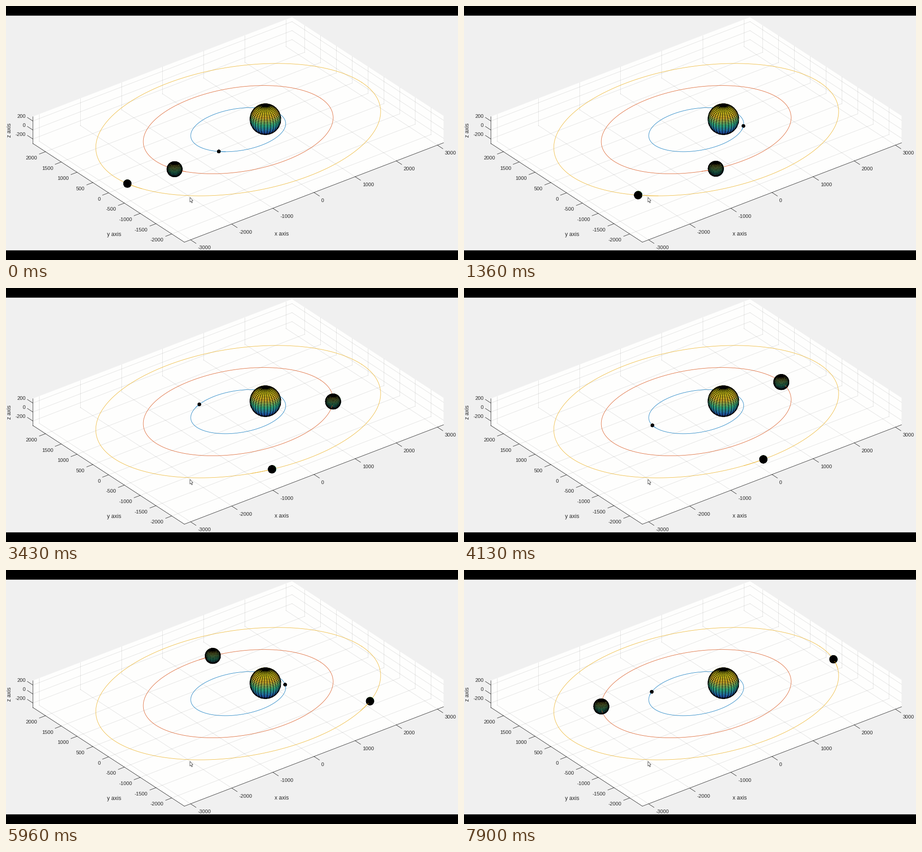
Animation of 998x561 px, one loop 8000 ms. Source, as a matplotlib script:

```python
import numpy as np
import matplotlib.pyplot as plt
from matplotlib.animation import FuncAnimation
from matplotlib.colors import LinearSegmentedColormap
from matplotlib.patches import Polygon, Rectangle

W, H, DPI = 998, 561, 100
PX = 72 / DPI                       # one pixel in points
INK = (0.15, 0.15, 0.15)
AZ, EL = np.radians(37.5), np.radians(30)
SCALE = 0.1145                      # pixels per data unit
CENTER = np.array([512.7, 273.1])
XM, YM, ZM = 3150, 2400, 300        # axis limits
N = 30                              # facets of each sphere
STEP_ANGLE = 2 * np.pi / 50
INTERVAL, FRAMES = 20, 400

PARULA = LinearSegmentedColormap.from_list(
    "parula", ["#3e26a8", "#2e87f7", "#37c897", "#e6bb2d", "#f9fb15"])


def project(x, y, z=0):
    """Orthographic view: screen x, screen y and depth toward the viewer."""
    across = x * np.cos(AZ) - y * np.sin(AZ)
    away = x * np.sin(AZ) + y * np.cos(AZ)
    sx = CENTER[0] + SCALE * across
    sy = CENTER[1] - SCALE * (away * np.sin(EL) + z * np.cos(EL))
    return sx, sy, z * np.sin(EL) - away * np.cos(EL)


fig = plt.figure(figsize=(W / DPI, H / DPI), dpi=DPI, facecolor="#f0f0f0")
ax = fig.add_axes([0, 0, 1, 1])
ax.set_xlim(0, W)
ax.set_ylim(H, 0)
ax.axis("off")


def segment(p, q, **style):
    a, b = project(*p), project(*q)
    ax.plot([a[0], b[0]], [a[1], b[1]], **style)


def label(x, y, text, ha="center", size=11.2, rotation=0):
    ax.text(x, y, text, ha=ha, va="center", color=INK, rotation=rotation,
            family="Liberation Sans", fontsize=size * PX)


def tick(point, direction, text, ha, offset):
    """Tick mark along a data direction, with its number beside it."""
    x, y, _ = project(*point)
    dx, dy = np.array(project(*direction)[:2]) - CENTER
    k = 14.5 / np.hypot(dx, dy)
    ax.plot([x, x + k * dx], [y, y + k * dy], color=INK, lw=0.85 * PX, zorder=1)
    label(x + offset[0], y + offset[1], text, ha)


def draw_box():
    corners = [(-XM, YM, -ZM), (-XM, YM, ZM), (XM, YM, ZM),
               (XM, -YM, ZM), (XM, -YM, -ZM), (-XM, -YM, -ZM)]
    ax.add_patch(Polygon([project(*c)[:2] for c in corners],
                         fc="#fefefd", ec="none", zorder=0))
    grid = dict(color=INK, alpha=0.14, lw=0.85 * PX, zorder=1)
    axis = dict(color=INK, lw=0.85 * PX, zorder=1)
    for x in range(-3000, 3001, 1000):
        segment((x, -YM, -ZM), (x, YM, -ZM), **grid)
        segment((x, YM, -ZM), (x, YM, ZM), **grid)
        tick((x, -YM, -ZM), (0, -1000, 0), str(x), "left", (16, 18))
    for y in range(-2000, 2001, 500):
        segment((-XM, y, -ZM), (XM, y, -ZM), **grid)
        segment((XM, y, -ZM), (XM, y, ZM), **grid)
        tick((-XM, y, -ZM), (-1000, 0, 0), str(y), "right", (-18, 14))
    for z in range(-200, 201, 200):
        segment((-XM, YM, z), (XM, YM, z), **grid)
        segment((XM, YM, z), (XM, -YM, z), **grid)
        tick((-XM, YM, z), (0, 1000, 0), str(z), "right", (-16, -10))
    segment((-XM, -YM, -ZM), (XM, -YM, -ZM), **axis)
    segment((-XM, -YM, -ZM), (-XM, YM, -ZM), **axis)
    segment((-XM, YM, -ZM), (-XM, YM, ZM), **axis)
    label(609, 504, "x axis", size=12.2)
    label(239, 505, "y axis", size=12.2)
    label(8, 274, "z axis", size=12.2, rotation=90)


def mesh_lines(radius):
    """Visible meridians, parallels and rim around the screen origin."""
    def visible(lon, lat):
        x, y, depth = project(radius * np.cos(lat) * np.cos(lon),
                              radius * np.cos(lat) * np.sin(lon),
                              radius * np.sin(lat))
        pts = np.column_stack([x, y]) - CENTER
        pts[depth < 0] = np.nan
        return np.vstack([pts, [np.nan, np.nan]])

    fine = np.linspace(-np.pi, np.pi, 2 * N + 1)
    parts = [visible(lon, fine / 2) for lon in fine[:-1:2]]
    parts += [visible(fine, lat) for lat in fine[2:-2:2] / 2]
    rim = SCALE * radius - 0.4
    parts.append(rim * np.column_stack([np.cos(fine), np.sin(fine)]))
    return np.vstack(parts)


def shaded_disc(radius, size=160):
    """Colour bands by height, as seen on the front of a sphere."""
    u, v = np.meshgrid(np.linspace(-1, 1, size), np.linspace(1, -1, size))
    front = np.sqrt(np.clip(1 - u**2 - v**2, 0, 1))
    z = np.clip(v * np.cos(EL) + front * np.sin(EL), -1, 1)
    band = np.floor((np.arcsin(z) / np.pi + 0.5) * N) / N
    z = np.sin((band - 0.5) * np.pi)
    rgba = PARULA(0.5 + 0.5 * z * radius / ZM)
    rgba[..., 3] = u**2 + v**2 <= 1
    return rgba


class Ball:
    def __init__(self, radius, zorder):
        self.r = radius * SCALE
        self.lines = mesh_lines(radius)
        self.disc = ax.imshow(shaded_disc(radius), aspect="auto", zorder=zorder,
                              extent=(0, 1, 1, 0))
        self.mesh, = ax.plot([], [], color="black", lw=0.75 * PX,
                             zorder=zorder + 0.1)

    def move(self, x, y):
        r = self.r
        self.disc.set_extent((x - r, x + r, y + r, y - r))
        self.mesh.set_data(self.lines[:, 0] + x, self.lines[:, 1] + y)


class Planet:
    def __init__(self, a, radius, rate, color, zorder):
        self.a, self.b, self.radius, self.rate = a, 0.75 * a, radius, rate
        style = dict(color=color, lw=0.8 * PX)
        x, y, _ = project(*self.at(np.linspace(0, 2 * np.pi, 300)))
        ax.plot(x, y, zorder=2, **style)
        self.ball = Ball(radius, zorder)
        self.near, = ax.plot([], [], zorder=zorder + 0.2, **style)

    def at(self, angle):
        return self.a * np.cos(angle), self.b * np.sin(angle)

    def move(self, step):
        angle = np.pi + self.rate * step * STEP_ANGLE
        px, py = self.at(angle)
        sx, sy, depth = project(px, py)
        self.ball.move(sx, sy)
        # the piece of orbit that comes out of the ball toward the viewer
        x, y = self.at(angle + np.linspace(-0.15, 0.15, 61))
        lx, ly, ld = project(x, y)
        hidden = (np.hypot(x - px, y - py) < self.radius) | (ld < depth)
        self.near.set_data(np.where(hidden, np.nan, lx),
                           np.where(hidden, np.nan, ly))


draw_box()
planets = [Planet(1000, 30, 1, "#0072bd", 3),
           Planet(2000, 150, 0.5, "#d95319", 5),
           Planet(3000, 75, 0.25, "#edb120", 6)]
sun = Ball(300, 4)
sun.move(*project(np.sqrt(1000**2 - 750**2), 0)[:2])

BAR = 21.3
for top in (0, H - BAR):
    ax.add_patch(Rectangle((0, top), W, BAR, fc="black", ec="none",
                           snap=False, zorder=8))

arrow = np.array([(0, 0), (0, 10.2), (2.3, 8.1), (4, 12), (5.6, 11.3),
                  (4, 7.5), (7, 7.2)])
ax.add_patch(Polygon(arrow + (406, 422.8), fc="white", ec="#444444",
                     lw=0.9 * PX, zorder=9))


def step_at(t):
    """Whole simulation steps done by t ms; the pace drops twice."""
    return int(np.interp(t, [-50, 760, 2200, 7330, 7900], [5, 15, 27, 87, 92]))


def draw(i):
    step = step_at((i + 0.5) * INTERVAL)
    # the inner planet skips one step when its lap restarts
    planets[0].move(step + (step >= 50))
    for planet in planets[1:]:
        planet.move(step)
    return []


anim = FuncAnimation(fig, draw, frames=FRAMES, interval=INTERVAL,
                     repeat=True, repeat_delay=0, blit=False)
plt.show()
```
